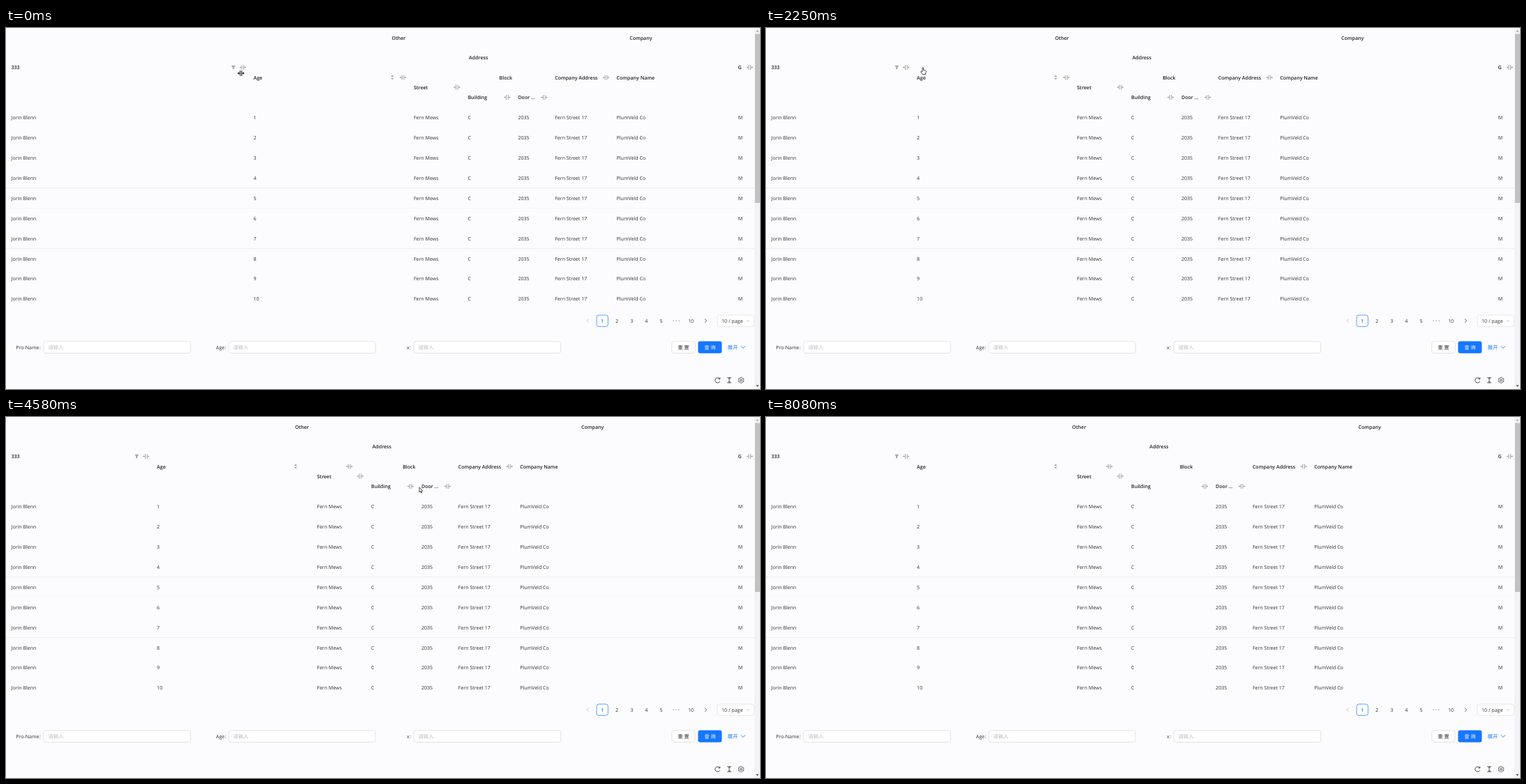
Animation, 1080 px wide and 518 px high, one loop 8760 ms. Source, as an HTML page:

```html
<!DOCTYPE html>
<html lang="en">
<head>
<meta charset="utf-8">
<title>Resizable table columns</title>
<style>
  html, body { margin: 0; width: 100%; height: 100%; overflow: hidden; background: #fcfcfe; }
  svg { display: block; width: 100%; height: 100%; }
  text {
    font: 7.05px "Open Sans", "Noto Sans", "Noto Sans CJK SC", "Noto Sans CJK", sans-serif;
    fill: #333; text-rendering: geometricPrecision; white-space: pre;
  }
  .head { font-weight: 600; fill: #222; }
  .cjk { font-family: "Noto Sans CJK SC", "Noto Sans CJK", sans-serif; font-size: 7.35px; }
  .hint { fill: #bfbfbf; }
  .blue { fill: #1677ff; }
  .white { fill: #fff; }
  .mid { text-anchor: middle; }
  .end { text-anchor: end; }
</style>
</head>
<body>
<svg id="stage" viewBox="0 0 1080 518"></svg>
<script>
const LOOP = 8760, STEP = 250 / 3;
const stage = document.getElementById('stage');

function el(tag, attrs = {}, parent = stage) {
  const node = document.createElementNS('http://www.w3.org/2000/svg', tag);
  for (const key in attrs) node.setAttribute(key, attrs[key]);
  return parent.appendChild(node);
}
const group = (parent = stage) => el('g', {}, parent);
const move = (node, x, y = 0) => node.setAttribute('transform', `translate(${x.toFixed(2)} ${y.toFixed(2)})`);

// y is the middle of the capitals
function label(str, x, y, cls = '', parent = stage) {
  const node = el('text', { x, y: y + 2.55, class: cls }, parent);
  node.textContent = str;
  return node;
}
const box = (x, y, width, height, fill, stroke = 'none', rx = 3, parent = stage) =>
  el('rect', { x, y, width, height, rx, fill, stroke, 'stroke-width': .7 }, parent);
const line = (d, stroke, width = .8, parent = stage) =>
  el('path', { d, stroke, 'stroke-width': width, fill: 'none', 'stroke-linejoin': 'round' }, parent);

function handle(x, y, parent = stage) {
  const g = group(parent);
  line('M-1.3-3.5v7M1.3-3.5v7', '#8f8f8f', .8, g);
  line('M-4.2 0h2.4M4.2 0h-2.4', '#a4a4a4', .7, g);
  el('path', { d: 'M-4.6 0l1.7-1.4v2.8zM4.6 0l-1.7-1.4v2.8z', fill: '#999' }, g);
  move(g, x, y);
  return g;
}

const rowY = i => 128.3 + 28.95 * i;
function column(title, titleY, cell) {
  const g = group();
  label(title, 7.5, titleY, 'head', g);
  for (let i = 0; i < 10; i++) label(cell(i), 7.5, rowY(i), '', g);
  return g;
}

// Row rules and hovered header
line('M0 229.5H1072M0 316.5H1072', '#efeff2', 1);
line('M0 258.5H1072', '#f7f7f9', 1);
const hover = box(0, 28, 229.5, 85.5, '#f1f1f6', 'none', 0);

// Table
column('333', 56.5, () => 'Jorin Blenn');
const filter = el('path', { d: 'M-3-2.8H3L1 .3V2.8H-1V.3Z', fill: '#a8a8a8' });
const nameHandle = handle(0, 0);

const age = column('Age', 71, i => i + 1);
el('path', { d: 'M206.3 67.3l2.2 2.6h-4.4zM206.3 74.3l2.2-2.6h-4.4z', fill: '#a8a8a8' }, age);
const ageHandle = handle(0, 0);

const street = column('Street', 85, () => 'Fern Mews');
handle(69.5, 85, street);
const building = column('Building', 99.5, () => 'C');
const buildingHandle = handle(0, 0);
const door = column('Door ...', 99.5, () => '2035');
handle(45, 99.5, door);
const address = column('Company Address', 71, () => 'Fern Street 17');
handle(80.8, 71, address);
const company = column('Company Name', 71, () => 'PlumVeld Co');

const [otherTitle, companyTitle, addressTitle, blockTitle] =
  [['Other', 14], ['Company', 14], ['Address', 42.7], ['Block', 71]]
    .map(([str, y]) => label(str, 0, y, 'head mid'));

const clip = el('clipPath', { id: 'cut' });
el('rect', { x: 1045, y: 50, width: 8.4, height: 14 }, clip);
label('G', 1048.6, 56.5, 'head').setAttribute('clip-path', 'url(#cut)');
for (let i = 0; i < 10; i++) label('M', 1048.8, rowY(i));
handle(1065.3, 56.5);

// Pagination
line('M834.5 417.4l-3 2.7 3 2.7', '#c4c4c4');
line('M1000.7 417.4l3 2.7-3 2.7', '#444');
box(846, 412, 16.3, 16.3, '#fff', '#1677ff');
label('1', 854.1, 420.3, 'mid head blue');
['2', '3', '4', '5'].forEach((n, i) => label(n, 875 + 21.15 * i, 420.3, 'mid'));
for (const x of [956, 960, 964]) el('circle', { cx: x, cy: 420.2, r: .9, fill: '#c0c0c0' });
label('10', 981, 420.3, 'mid');
box(1018.8, 412, 52.8, 16.3, '#fff', '#dedede');
label('10 / page', 1025, 420.3);
line('M1060.8 419l2.3 2.5 2.3-2.5', '#bbb', .7);

// Search form
for (const [name, right, x] of [['Pro-Name', 47.5, 54], ['Age', 313, 319], ['x', 577.6, 584.3]]) {
  label(name, right, 458.2, 'end');
  label(':', right + .5, 458.2);
  box(x, 449.8, 210.3, 16.8, '#fff', '#d9d9d9');
  label('请输入', x + 6.2, 458.2, 'cjk hint');
}
box(953.8, 449.8, 33.2, 16.8, '#fff', '#d9d9d9');
label('重 置', 970.5, 458.2, 'cjk mid');
box(991.3, 449.4, 34, 17.4, '#1677ff');
label('查 询', 1008.4, 458.2, 'cjk mid white');
label('展开', 1033.6, 458.2, 'cjk blue');
line('M1053 456.3l2.9 3.4 2.9-3.4', '#1677ff');

// Toolbar icons
line('M1022.2 503.3A3.6 3.6 0 1 0 1022.5 507M1022.7 501.5v2.3h-2.4', '#333', .9);
line('M1033 501.7h6M1033 509h6M1036 502v7M1034.7 503.6l1.3-1.5 1.3 1.5M1034.7 507.1l1.3 1.5 1.3-1.5', '#333');
const gear = Array.from({ length: 24 }, (_, i) => {
  const r = i % 4 < 2 ? 4.1 : 3.3, a = (i - .5) * Math.PI / 12;
  return `${(1053 + r * Math.sin(a)).toFixed(2)} ${(505.3 - r * Math.cos(a)).toFixed(2)}`;
});
line(`M${gear.join('L')}Z`, '#333');
el('circle', { cx: 1053, cy: 505.3, r: 1.4, fill: 'none', stroke: '#333', 'stroke-width': .8 });

// Scrollbar
box(1072, 0, 8, 518, '#f3f3f5', 'none', 0);
box(1072.8, 8.5, 7.2, 242.5, '#c1c1c1', 'none', 0);
el('path', { d: 'M1076.3 3l2.1 2.6h-4.2z', fill: '#a3a3a3' });
el('path', { d: 'M1076.3 515l2.1-2.6h-4.2z', fill: '#505050' });

// Tooltip
const tip = group();
tip.style.filter = 'drop-shadow(0 2px 4px rgba(0,0,0,.16))';
box(276, 38.3, 82.6, 18, '#232325', 'none', 3, tip);
el('path', { d: 'M313.3 56h8.4l-3.5 3.5q-.7.6-1.4 0z', fill: '#232325' }, tip);
label('Click to sort ascending', 317.3, 47.5, 'mid white', tip);

// Pointers
const pointers = { resize: group(), hand: group(), arrow: group() };
line('M-1.1-3.9v7.8M1.1-3.9v7.8', '#111', 1, pointers.resize);
line('M-4 0h2.5M4 0h-2.5', '#111', .9, pointers.resize);
el('path', { d: 'M-5 0l2.2-1.9v3.8zM5 0l-2.2-1.9v3.8z', fill: '#111' }, pointers.resize);
const outline = { fill: '#fff', stroke: '#111', 'stroke-width': .75, 'stroke-linejoin': 'round' };
el('path', { d: 'M-1.7 1V-4q0-.8.8-.8t.8.8v3l3 .7q1 .3.8 1.3L3 3.4V5H-1.3L-3.8 1.7q-.3-1 .6-1.1z', ...outline }, pointers.hand);
el('path', { d: 'M.3.3V7.5L1.9 6.1 3 8.6 4.1 8.1 3 5.7H5z', ...outline }, pointers.arrow);

// time, x, y, shape from that time on
const path = [
  [0, 336.5, 65, 'resize'], [83, 337, 60], [166, 338, 56], [250, 338, 56], [666, 250, 55],
  [833, 250, 56], [1000, 251, 57], [1250, 258, 60, 'hand'], [1500, 262, 62], [1583, 257, 60],
  [1666, 251, 57, 'resize'], [2000, 201, 57], [2083, 202, 57], [2166, 213, 60, 'hand'],
  [2250, 225.5, 61.5], [2583, 328.5, 69.5], [2666 - 40, 328.5, 69.5], [3083, 426, 73, 'resize'],
  [3166, 434, 72], [3250, 434, 72], [3833, 547, 86.5], [4166, 584, 98], [4250, 584, 101, 'arrow'],
  [4416, 587, 100], [4500, 587, 100], [4583, 591.5, 100.5], [4666, 612, 98], [4750, 627, 97, 'resize'],
  [4916, 627, 97], [5083, 615, 102, 'arrow'], [5416, 598, 105], [5666, 586, 101],
  [5750, 582, 99.5, 'resize'], [5833, 580, 99], [6000, 609, 100], [6083, 609, 100], [6333, 607, 100],
  [6666, 607, 100], [6750, 607, 100.3], [6833, 607, 100.3], [7166, 629, 99.5], [7250, 631, 98],
  [7333, 655, 92, 'arrow'], [7583, 865, 47], [7750, 964, 25], [8000, 1030, .5], [8080, 1035, -20]
];

function tween(keys, t) {
  let i = 0;
  while (i < keys.length - 1 && keys[i + 1][0] <= t) i++;
  const a = keys[i], b = keys[i + 1] || a;
  const k = a === b ? 0 : (t - a[0]) / (b[0] - a[0]);
  return [1, 2].map(n => a[n] + (b[n] - a[n]) * k || 0);
}
const fade = (t, from, to) => Math.max(0, Math.min(1, (t - from) / (to - from)));

function draw(time) {
  const t = Math.floor((time + 4) / STEP) * STEP + .5;

  // Widths change when a handle is let go
  const ageX = t < 833 ? 347 : t < 2083 ? 258.2 : 208.6;
  const extra = t < 6166 ? 0 : t < 7250 ? 29.1 : 49.1;
  const streetX = ageX + 229.4, buildX = streetX + 77.5;
  const doorX = buildX + 72 + extra, addrX = doorX + 52.8, nameX = addrX + 88.4;

  move(age, ageX);
  move(street, streetX);
  move(building, buildX);
  move(door, doorX);
  move(address, addrX);
  move(company, nameX);
  move(filter, ageX - 21.3, 56.5);
  move(nameHandle, ageX - 7.8, 56.5);
  move(ageHandle, ageX + (t < 3917 ? 221.6 : 283.2), 71);
  move(buildingHandle, buildX + 64 + extra, 99.5);
  otherTitle.setAttribute('x', (ageX + addrX) / 2 - .5);
  addressTitle.setAttribute('x', (streetX + addrX) / 2 - .8);
  blockTitle.setAttribute('x', (buildX + addrX) / 2 - .5);
  companyTitle.setAttribute('x', (addrX + 1040) / 2);

  hover.setAttribute('x', ageX - .6);
  hover.setAttribute('opacity', t < 1800
    ? .45 * fade(t, 1333, 1500) * (1 - fade(t, 1510, 1660))
    : fade(t, 2250, 2500) * (1 - fade(t, 3840, 4080)));
  tip.setAttribute('opacity', fade(t, 2400, 2580) * (1 - fade(t, 3840, 4000)));

  const [x, y] = tween(path, t);
  const shape = path.reduce((s, key) => key[0] <= t && key[3] ? key[3] : s, 'resize');
  for (const name in pointers) {
    pointers[name].setAttribute('visibility', name === shape && t < 8080 ? 'visible' : 'hidden');
  }
  move(pointers[shape], x, y);
}

const start = performance.now();
function tick(now) {
  draw(Math.max(0, now - start) % LOOP);
  requestAnimationFrame(tick);
}
draw(0);
requestAnimationFrame(tick);
</script>
</body>
</html>
```
